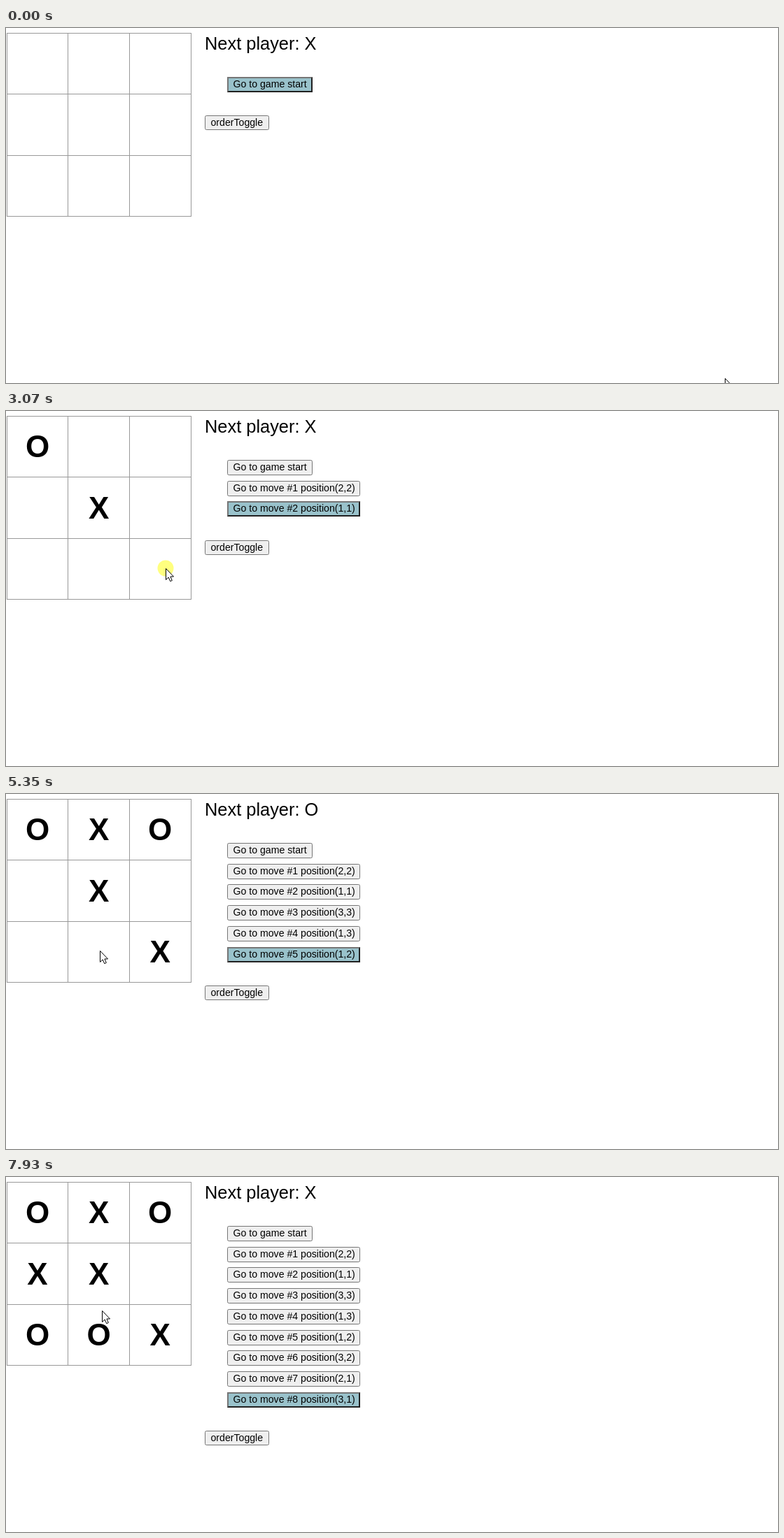
Animation, 1103 px wide and 508 px high, one loop 8 s. Source, as an HTML page:

```html
<!DOCTYPE html>
<html lang="en">
<head>
<meta charset="utf-8">
<title>Tic-tac-toe</title>
<style>
  html, body { margin: 0; width: 100%; height: 100%; overflow: hidden; background: #fff; }
  svg { display: block; }
  text { font: 14.13px "Liberation Sans", Arial, sans-serif; white-space: pre; }
  .status { font-size: 25.4px; }
  .mark { font-size: 44px; font-weight: bold; text-anchor: middle; }
</style>
</head>
<body>
<svg id="stage" width="1103" height="508"></svg>
<script>
const LOOP = 8000;
const ROW_PITCH = 29.73;
const stage = document.getElementById('stage');

// Each move: row, column, highlight time, time the mark lands.
const moves = [
  [2, 2, 622, 691],
  [1, 1, 1790, 1920],
  [3, 3, 3070, 3150],
  [1, 3, 4110, 4190],
  [1, 2, 4780, 4860],
  [3, 2, 5550, 5630],
  [2, 1, 6560, 6890],
  [3, 1, 7504, 7575],
].map(([row, col, press, land]) => ({ row, col, press, land }));

// Each glide: first step, last step, step count, end point, optional bend point.
const origin = [1027, 501];
const glides = [
  [70, 553, 8, [140, 150]],
  [760, 830, 2, [115, 211]],
  [900, 1520, 9, [53, 81], [54, 222]],
  [1990, 2340, 6, [228, 225]],
  [3220, 3710, 8, [221, 55], [255, 130]],
  [4270, 4690, 6, [111, 51]],
  [4930, 5350, 7, [134, 224]],
  [5720, 6300, 8, [56, 160]],
  [7220, 7433, 4, [58, 226]],
  [7646, 7930, 5, [137, 191]],
].map(([start, end, steps, to, bend]) => ({ start, end, steps, to, bend }));

const ease = p => (1 - Math.cos(Math.PI * p)) / 2;

function cursorAt(t) {
  let from = origin;
  for (const { start, end, steps, to, bend } of glides) {
    if (t < start) break;
    if (t < end) {
      const step = Math.floor((t - start) / (end - start) * (steps - 1)) + 1;
      const p = ease(step / steps), q = 1 - p;
      return from.map((a, i) => {
        const middle = bend ? bend[i] : (a + to[i]) / 2;
        return Math.round(q * q * a + 2 * p * q * middle + p * p * to[i]);
      });
    }
    from = to;
  }
  return from;
}

const rect = (x, y, w, h, fill, extra = '') =>
  `<rect x="${x}" y="${y}" width="${w}" height="${h}" fill="${fill}" ${extra}/>`;
const label = (x, y, content, kind = '') =>
  `<text x="${x}" y="${y}" class="${kind}">${content}</text>`;

function button(x, y, w, h, content, active) {
  const box = active
    ? rect(x, y, w, h, '#212121') +
      `<path d="M${x} ${y + h}V${y}h${w}l-2 2v${h - 4}H${x + 2}z" fill="#767676"/>` +
      rect(x + 2, y + 2, w - 4, h - 4, '#99c2cb')
    : rect(x + .5, y + .5, w - 1, h - 1, '#efefef', 'rx="2" stroke="#767676"');
  return box + label(x + 8.5, y + 15, content);
}

const board = '<path fill="none" stroke="#999" d="' +
  [1.5, 88.5, 176.5, 264.5].map(x => `M${x} 7V270`).join('') +
  [7.5, 94.5, 182.5, 269.5].map(y => `M1 ${y}H265`).join('') + '"/>';

const mark = ({ row, col }, i) =>
  label(45 + 87.6 * (col - 1), 66 + 87.6 * (row - 1), 'XO'[i % 2], 'mark');

function history(played) {
  const rowTop = i => Math.round(69.9 + ROW_PITCH * i);
  const last = played.length;
  return button(316, rowTop(0), 122, 22, 'Go to game start', last === 0) +
    played.map(({ row, col }, i) =>
      button(316, rowTop(i + 1), 190, 22,
        `Go to move #${i + 1} position(${row},${col})`, i + 1 === last)).join('') +
    button(284, Math.round(125.4 + ROW_PITCH * last), 92, 21, 'orderToggle', false);
}

function pointer(t) {
  const [x, y] = cursorAt(t);
  const pressed = moves.some(m => t >= m.press && t < m.land);
  return (pressed ? `<circle cx="${x}" cy="${y}" r="11.5" fill="#ff0" fill-opacity=".5"/>` : '') +
    `<path transform="translate(${x + .5} ${y + .5})" fill="#fff" stroke="#000" ` +
    'd="M0 0V16L3.7 12.5L6.2 18.2L8.8 17L6.4 11.5H11z"/>';
}

function draw(now) {
  const t = now % LOOP;
  const played = moves.filter(m => t >= m.land);
  stage.innerHTML = board + played.map(mark).join('') +
    label(284, 30.5, 'Next player: ' + 'XO'[played.length % 2], 'status') +
    history(played) + pointer(t);
}

const began = performance.now();
function tick() {
  draw(performance.now() - began);
  requestAnimationFrame(tick);
}
tick();
</script>
</body>
</html>
```
